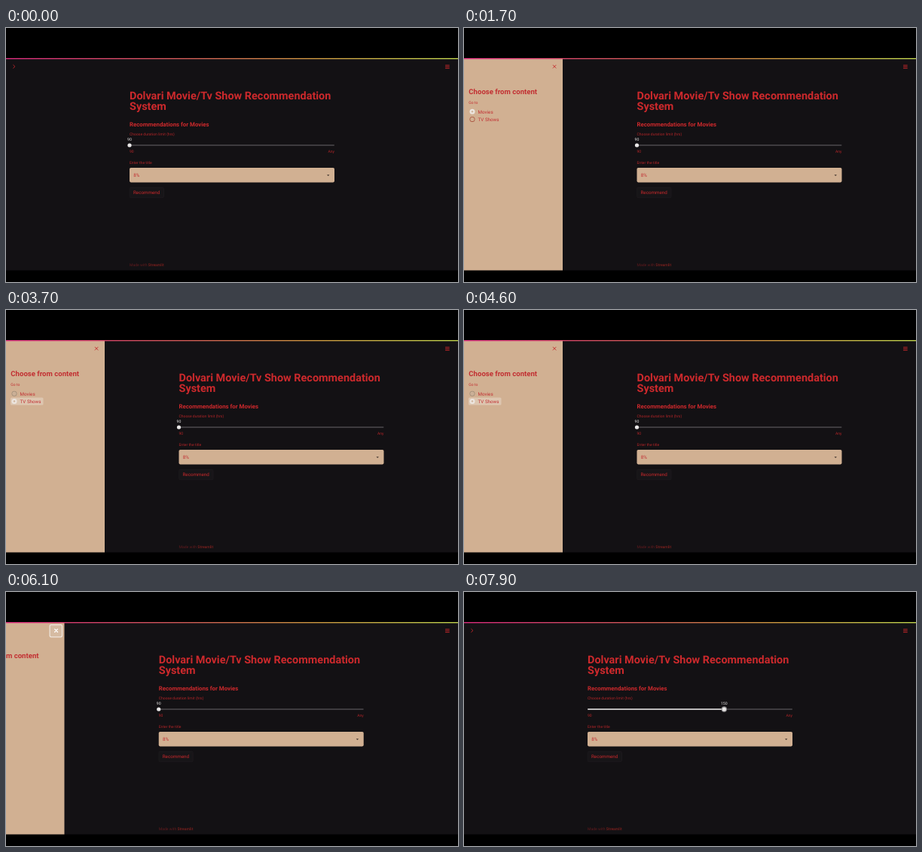
These frames come from a looping animation (600 px wide and 338 px high, 8000 ms). An HTML page:

```html
<!DOCTYPE html>
<html lang="en">
<head>
<meta charset="utf-8">
<title>Recommendation app</title>
<style>
  html, body { margin: 0; width: 100%; height: 100%; overflow: hidden; background: #000; }
  svg { display: block; width: 100vw; height: 100vh; }
  text { font-family: Roboto, "Open Sans", sans-serif; fill: #cc292c; text-rendering: geometricPrecision; }
  .title { font-size: 14.46px; font-weight: 700; }
  .sub { font-size: 7.83px; font-weight: 700; }
  .label { font-size: 5.05px; fill: #b32528; }
  .body { font-size: 6.25px; }
  .side { fill: #c22f32; }
  .foot { font-size: 5.1px; fill: #611b1e; }
  .line { fill: none; stroke: #c4282b; stroke-linecap: round; }
</style>
</head>
<body>
<svg viewBox="0 0 600 338">
  <defs>
    <linearGradient id="rainbow">
      <stop offset="0" stop-color="#d92a7c"/>
      <stop offset=".4" stop-color="#cf5a55"/>
      <stop offset=".68" stop-color="#cc963f"/>
      <stop offset="1" stop-color="#bfd24c"/>
    </linearGradient>
    <clipPath id="page"><rect y="41" width="600" height="281.5"/></clipPath>
  </defs>
  <rect width="600" height="338"/>
  <g clip-path="url(#page)">
    <rect y="41" width="600" height="282" fill="#131114"/>
    <path class="line" d="M583.5 49.6h4.8M583.5 51.6h4.8M583.5 53.6h4.8" stroke-width=".9"/>

    <g id="expand">
      <rect id="expandBox" x="2.8" y="43.6" width="16.6" height="16.2" rx="2" fill="#d0c9cc" stroke="#8f898c" stroke-width="1.2"/>
      <path id="expandIcon" class="line" d="M9.7 49.2l2.2 2.1-2.2 2.1" stroke-width=".9"/>
    </g>

    <g id="main">
      <text class="title" x="164" y="94.6">Dolvari Movie/Tv Show Recommendation</text>
      <text class="title" x="164" y="108.6">System</text>
      <text class="sub" x="164" y="130.5">Recommendations for Movies</text>
      <text class="label" x="164" y="143.1">Choose duration limit (hrs)</text>
      <rect x="164" y="155.2" width="272" height="1.6" rx=".8" fill="#4c4a4d"/>
      <rect id="fill" x="164" y="155.2" height="1.6" rx=".8" fill="#e6e4e4"/>
      <g id="thumb">
        <circle id="halo" cy="156" r="3.7" fill="#8b898b"/>
        <circle cy="156" r="2.6" fill="#e9e7e7"/>
        <text id="value" y="150.4" text-anchor="middle" style="font-size:5.2px;fill:#e4e2e2"></text>
      </g>
      <text class="label" x="164" y="165.6">90</text>
      <text class="label" x="436" y="165.6" text-anchor="end">Any</text>
      <text class="label" x="164" y="180.8">Enter the title</text>
      <rect x="164" y="186" width="272" height="19.4" rx="1.8" fill="#d1b092"/>
      <text class="body side" x="169.3" y="198.2">8%</text>
      <path d="M426 195.2h3.4l-1.7 1.8z" fill="#3c3029"/>
      <rect x="164.2" y="212.2" width="45.3" height="13.6" rx="1.6" fill="#171518" stroke="#242125" stroke-width=".5"/>
      <text class="body" x="169" y="221.2">Recommend</text>
      <text class="foot" x="164" y="317.4">Made with <tspan font-weight="500" fill="#81211f">Streamlit</tspan></text>
    </g>

    <g id="sidebar">
      <rect y="41" width="131" height="282" fill="#d1b092"/>
      <rect id="closeBox" x="111.6" y="43.6" width="16.4" height="16.2" rx="2" fill="#d6bba2" stroke="#efe6dd" stroke-width="1.2"/>
      <path id="closeIcon" class="line" d="M118.2 49.4l3.8 3.8m0-3.8l-3.8 3.8" stroke-width=".9"/>
      <text class="side" x="6.3" y="87.8" style="font-size:9.6px;font-weight:700">Choose from content</text>
      <text class="label side" x="6.3" y="101">Go to</text>
      <rect id="focus" x="6" y="116.4" width="43.5" height="10.2" rx="1.6" fill="#ddc6b0"/>
      <g id="radios"></g>
      <text class="body side" x="18.6" y="113.6">Movies</text>
      <text class="body side" x="18.6" y="123.6">TV Shows</text>
    </g>
  </g>
  <rect y="40" width="600" height="1.4" fill="url(#rainbow)"/>
</svg>
<script>
const LOOP = 8000, STEP = 100, SIDE = 131, TRACK = 272;
const $ = id => document.getElementById(id);
const set = (id, attrs) => {
  for (const k in attrs) $(id).setAttribute(k, attrs[k]);
};
const show = (id, on) => set(id, { visibility: on ? "inherit" : "hidden" });
const clamp = x => Math.min(1, Math.max(0, x));

// cubic-bezier(.25, .1, .25, 1)
function ease(x) {
  if (x <= 0 || x >= 1) return clamp(x);
  const curve = (u, a, b) => 3 * a * u * (1 - u) ** 2 + 3 * b * u * u * (1 - u) + u ** 3;
  let lo = 0, hi = 1;
  for (let i = 0; i < 30; i++) {
    const mid = (lo + hi) / 2;
    if (curve(mid, .25, .25) < x) lo = mid; else hi = mid;
  }
  return curve(lo, .1, 1);
}

const slide = (t, start) => ease((t - start) / 300);

const radioLooks = {
  on: { ring: "#ece5df", dot: "#cfb49c" },
  off: { ring: "#a9543f", dot: "#d1b092" },
  dim: { ring: "#a08d78", dot: "#cbb097" },
  pressed: { ring: "#ded2cc", dot: "#948b9f" }
};

function radio(y, look) {
  const { ring, dot } = radioLooks[look];
  const inner = look === "on" ? 1.2 : look === "pressed" ? 2.2 : 2.7;
  return `<circle cx="11" cy="${y}" r="3.5" fill="${ring}"/>` +
    `<circle cx="11" cy="${y}" r="${inner}" fill="${dot}"/>`;
}

function draw(t) {
  const open = slide(t, 1375) - slide(t, 6025);
  set("main", { transform: `translate(${open * SIDE / 2} 0)` });
  set("sidebar", { transform: `translate(${(open - 1) * SIDE} 0)` });
  show("sidebar", open > 0);
  show("expand", open === 0);

  const pressed = t >= 1100 && t < 1500;
  show("expandBox", pressed && open === 0);
  set("expandIcon", { style: pressed ? "stroke:#fff;stroke-width:1.7" : "" });

  const closing = t >= 5900;
  show("closeBox", closing && open > 0);
  set("closeIcon", { style: closing ? "stroke:#fff;stroke-width:1.3" : "" });

  const tvPress = t >= 2700 && t < 3000, tvOn = t >= 3000;
  show("focus", t >= 2600 && open > 0);
  $("radios").innerHTML =
    radio(111.3, tvOn ? "dim" : "on") +
    radio(121.4, tvOn ? "on" : tvPress ? "pressed" : "off");

  const notch = t >= 7800 ? 2 : t >= 7300 ? 1 : 0;
  const reach = TRACK * notch / 3;
  set("fill", { width: reach });
  set("thumb", { transform: `translate(${164 + reach} 0)` });
  show("halo", notch > 0);
  $("value").textContent = 90 + 30 * notch;
}

const begin = performance.now();
function tick() {
  const t = (performance.now() - begin) % LOOP;
  draw(Math.floor(t / STEP) * STEP);
  requestAnimationFrame(tick);
}
tick();
</script>
</body>
</html>
```
